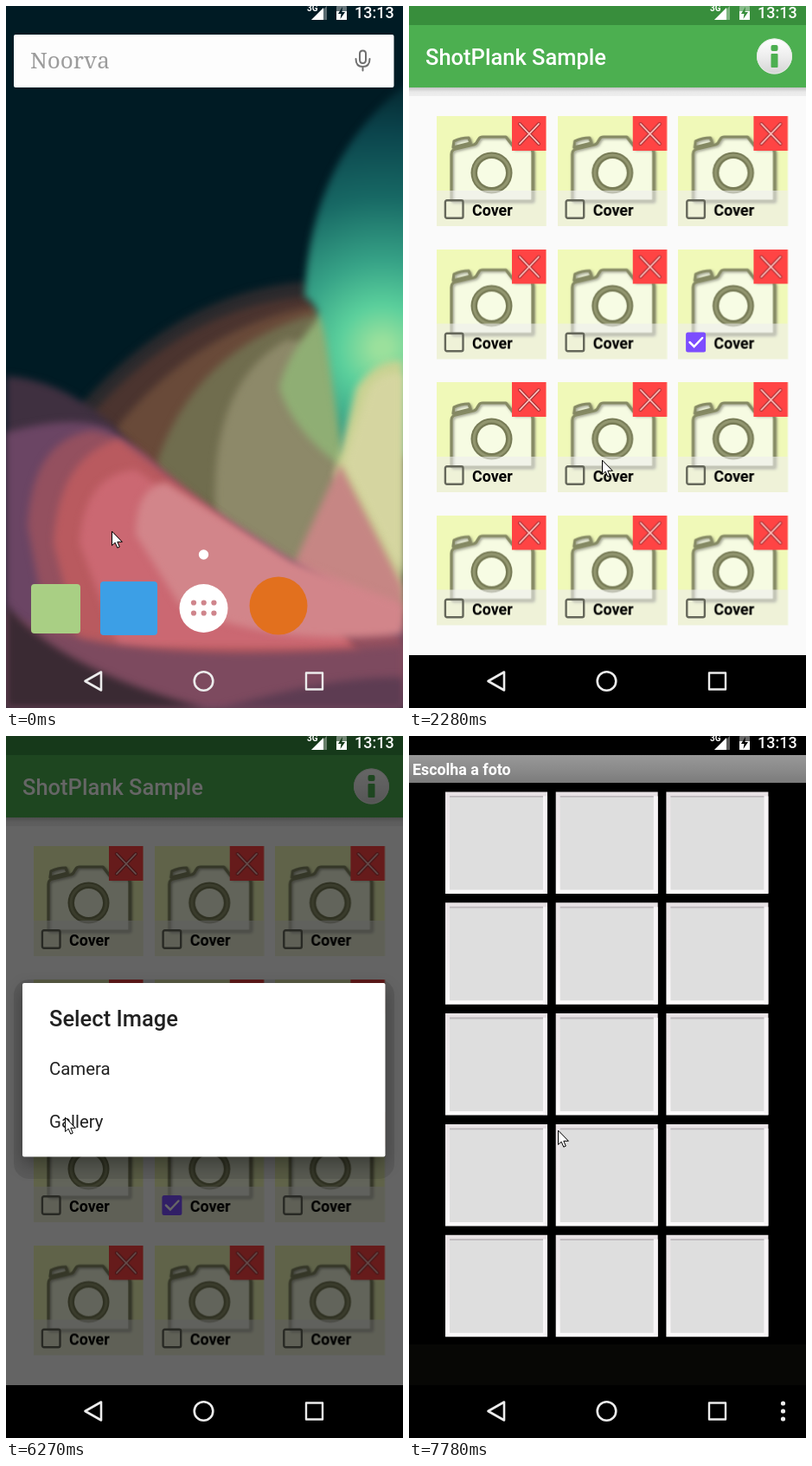
Animation, 459 px wide and 810 px high, one loop 8 s. Source, as an HTML page with a canvas:

```html
<!DOCTYPE html>
<html lang="en">
<head>
<meta charset="utf-8">
<title>Photo picker walkthrough</title>
<style>
html, body { margin: 0; width: 100%; height: 100%; overflow: hidden; background: #000; }
canvas { display: block; width: 100%; height: 100%; }
</style>
</head>
<body>
<canvas id="stage" width="459" height="810"></canvas>
<script>
const W = 459, H = 810, LOOP = 8000, NAV_TOP = 749;
const FONT = 'Roboto, sans-serif';
let ctx = document.getElementById('stage').getContext('2d');

const bursts = [[120, 910, 7], [1060, 1060, 1], [1180, 1330, 2], [1700, 1850, 2], [2280, 3840, 13],
  [3960, 4230, 3], [4510, 5180, 6], [5460, 6270, 7], [6570, 7230, 6], [7510, 7780, 3]];
const ticks = [0, ...bursts.flatMap(([a, b, n]) =>
  Array.from({ length: n }, (_, i) => Math.round(a + (b - a) * i / Math.max(1, n - 1))))];

// Pointer path: [time, x, y]
const pointerPath = [[0, 122, 606], [383, 66, 685], [515, 62, 690], [650, 66, 686], [910, 140, 627],
  [1060, 142, 618], [1700, 142, 618], [1850, 151, 616], [2150, 151, 616], [2280, 223, 524], [2540, 265, 435],
  [2800, 275, 396], [3060, 240, 396], [3320, 80, 388], [3450, 50, 384], [3580, 50, 384], [3840, 130, 438],
  [4090, 178, 515], [4230, 190, 534], [4644, 190, 534], [5180, 219, 490], [5460, 219, 490],
  [6135, 72, 437], [6270, 68, 440], [6700, 68, 440], [7230, 172, 455]];

function pointerAt(t) {
  const i = pointerPath.findIndex(p => p[0] > t);
  if (i < 0) return pointerPath.at(-1).slice(1);
  const [t0, x0, y0] = pointerPath[i - 1], [t1, x1, y1] = pointerPath[i];
  const k = (t - t0) / (t1 - t0);
  return [x0 + (x1 - x0) * k, y0 + (y1 - y0) * k];
}

const progress = (t, start, length) => Math.min(1, Math.max(0, (t - start) / length));

function rect(x, y, w, h, color, r = 0) {
  ctx.fillStyle = color;
  ctx.beginPath();
  ctx.roundRect(x, y, w, h, r);
  ctx.fill();
}
function disc(x, y, r, color) {
  ctx.fillStyle = color;
  ctx.beginPath();
  ctx.arc(x, y, r, 0, 7);
  ctx.fill();
}
function ring(x, y, r, color, width) {
  ctx.strokeStyle = color;
  ctx.lineWidth = width;
  ctx.beginPath();
  ctx.arc(x, y, r, 0, 7);
  ctx.stroke();
}
function fill(path, color) {
  ctx.fillStyle = color;
  ctx.fill(new Path2D(path));
}
function line(path, color, width) {
  ctx.strokeStyle = color;
  ctx.lineWidth = width;
  ctx.stroke(new Path2D(path));
}
function text(s, x, y, size, color, weight = 400, family = FONT) {
  ctx.font = `${weight} ${size}px ${family}`;
  ctx.fillStyle = color;
  ctx.fillText(s, x, y);
}
function gradient(y0, y1, ...colors) {
  const g = ctx.createLinearGradient(0, y0, 0, y1);
  colors.forEach((c, i) => g.addColorStop(i / (colors.length - 1), c));
  return g;
}
function at(x, y, alpha, draw) {
  ctx.save();
  ctx.translate(x, y);
  ctx.globalAlpha *= alpha;
  draw();
  ctx.restore();
}
// Draws once onto a separate layer.
function prerender(w, h, draw) {
  const layer = document.createElement('canvas'), main = ctx;
  layer.width = w;
  layer.height = h;
  ctx = layer.getContext('2d');
  ctx.lineCap = ctx.lineJoin = 'round';
  draw();
  ctx = main;
  return layer;
}

const hills = [
  ['#2b2a2d', 'M85 462Q200 330 345 318L459 400V810H85Z'],
  ['#4b342f', 'M100 470Q210 345 350 335L400 500V810H100Z'],
  ['#694a39', 'M125 490Q220 370 360 345L400 810H125Z'],
  ['#706d4e', 'M170 540Q215 390 370 352L420 810H170Z'],
  ['#8d8969', 'M245 620Q225 440 325 385L385 395L420 810Z'],
  ['#8fae74', 'M316 440Q325 400 370 350L400 380L392 535Q330 490 316 440Z']
];
const slopes = [
  ['#c9d292', 'M459 410Q430 405 405 440L380 540L459 705Z'],
  ['#d5d5a0', 'M459 425Q430 420 418 445L390 530L459 660Z'],
  ['#c68684', 'M386 528L459 670V760L330 650Z'],
  ['#3f3040', 'M0 427Q60 430 120 480L230 595L459 720V810H0Z'],
  ['#6b4564', 'M0 492Q80 470 120 488L200 560L459 720V810H0Z'],
  ['#94505f', 'M25 600Q30 500 100 490Q150 500 180 535L260 600L459 730V790H60Z'],
  ['#b95a5f', 'M55 620Q60 520 130 500L180 538L300 630L420 760H90Z'],
  ['#cb6872', 'M85 620Q90 540 150 535L200 570L350 670L400 740H130Z'],
  ['#d2858a', 'M150 610Q150 555 185 550L330 640L459 690V725Q300 740 200 690Z'],
  ['#7d4a5f', 'M0 700Q120 765 459 738V810H0Z'],
  ['#3a2a33', 'M0 690Q60 765 230 810H0Z'],
  ['#5d3c52', 'M250 810Q380 772 459 775V810Z']
];
const wallpaper = prerender(W, H, () => {
  rect(0, 0, W, H, '#001b24');
  ctx.filter = 'blur(4px)';
  hills.forEach(([color, path]) => fill(path, color));
  const glow = ctx.createRadialGradient(435, 395, 10, 435, 395, 310);
  [[0, '#9be09c'], [.13, '#5bd09c'], [.3, '#37a387'], [.55, '#176864'], [.8, '#0b444c'], [1, '#04262f']]
    .forEach(stop => glow.addColorStop(...stop));
  fill('M470 85Q352 170 345 335Q365 345 372 400L390 520H470Z', glow);
  slopes.forEach(([color, path]) => fill(path, color));
});

const photoCell = prerender(130, 130, () => {
  rect(0, 0, 126.5, 127, '#f0f9b8');
  ctx.shadowColor = 'rgba(70,70,60,.5)';
  ctx.shadowBlur = 3;
  ctx.shadowOffsetX = ctx.shadowOffsetY = 1.5;
  const body = 'M17 96V44Q17 39 22 38L43 33Q46 32 47 29L49 26Q50 24 53 24H80L90 37H108Q111 38 111 42V96Q111 98 109 98H19Q17 98 17 96Z';
  const button = 'M19 36L20 29Q28 25 37 25L39 31Z';
  for (const part of [button, body]) {
    fill(part, '#f6fbe2');
    line(part, '#868a64', 3.2);
  }
  ctx.shadowColor = 'transparent';
  disc(63.5, 65.5, 24, '#777b56');
  ring(63.5, 65.5, 20.5, '#92966f', 3);
  disc(63.5, 65.5, 16.5, '#f7fce4');
  rect(0, 86, 126.5, 41, 'rgba(238,238,238,.6)');
  rect(87, 0, 39.5, 40, '#ff4444');
  const cross = 'M96 9L118 32M118 9L96 32';
  line(cross, '#b03236', 4);
  line(cross, '#ffc4c0', 1.8);
  text('Cover', 41, 114.5, 17.85, '#000', 700);
});

function checkbox(x, y, checked) {
  at(x, y, 1, () => {
    if (!checked) {
      ctx.strokeStyle = '#65675a';
      ctx.lineWidth = 2.4;
      ctx.beginPath();
      ctx.roundRect(1.2, 1.2, 20.6, 20.6, 2);
      ctx.stroke();
      return;
    }
    rect(0, 0, 23, 23, '#7c4dff', 2.5);
    ctx.lineCap = ctx.lineJoin = 'miter';
    line('M4.5 11.5L9.5 16.5L19 6.5', '#fff', 2.5);
  });
}

function statusBar(color) {
  if (color) rect(0, 0, W, 22, color);
  text('3G', 348, 6, 10, '#fff', 700);
  fill('M353 16L371 0V16Z', 'rgba(255,255,255,.35)');
  fill('M353 16L367 2V16Z', '#fff');
  rect(382, 0, 12, 16, 'rgba(255,255,255,.4)', 1);
  rect(382, 6, 12, 10, '#fff');
  fill('M389 1L384 9H387.5L386.5 15L392 7H388.5Z', color || '#001b24');
  text('13:13', 403, 14, 18, '#fff', 500);
}

function navBar(background, menu) {
  if (background) rect(0, NAV_TOP, W, H - NAV_TOP, '#000');
  ctx.lineJoin = 'round';
  line('M91.5 779L110 768.5V789.5Z', '#ececec', 2.6);
  ring(228.5, 779, 10.8, '#ececec', 2.6);
  line('M347 769.5H366V788.5H347Z', '#ececec', 2.4);
  if (menu) [770, 779, 788].forEach(y => disc(432.5, y, 2.6, '#ececec'));
}

function home() {
  ctx.drawImage(wallpaper, 0, 0);
  statusBar();
  rect(9, 33, 439.5, 61, '#fdfdfd', 2);
  text('Noorva', 28, 72, 26, '#9c9c9c', 400, '"Noto Serif", serif');
  rect(408.5, 51, 8, 16, '#fff', 4);
  line('M412.5 51.5Q416 51.5 416 55V62Q416 66 412.5 66Q409 66 409 62V55Q409 51.5 412.5 51.5Z', '#707070', 2);
  line('M404.5 61Q404.5 70 412.5 70Q420.5 70 420.5 61M412.5 70V74.5', '#707070', 2);
  disc(228.5, 633, 5.7, '#fff');
  rect(29, 667, 57, 57, '#a9cf84', 4);
  rect(109, 664, 66, 62, '#3c9fe6', 4);
  disc(228.5, 695, 28, '#fff');
  for (let i = 0; i < 6; i++) disc(217 + i % 3 * 11.7, 688.5 + (i > 2) * 12, 3.1, '#cf858c');
  disc(315, 692, 33.5, '#e2701e');
  navBar(false);
}

function splash() {
  rect(0, 0, W, NAV_TOP, '#fafafa');
  statusBar('#303f9f');
  navBar(true);
}

function infoButton() {
  disc(422.5, 58, 20.5, gradient(38, 79, '#ffffff', '#ededed', '#d4d4d4'));
  ring(422.5, 58, 20, '#e4ebe4', 1);
  rect(418.5, 45, 8, 7, '#4caf50', 2);
  rect(418.5, 55, 8, 16, '#4caf50', 1);
}

function photoApp(t) {
  rect(0, 0, W, NAV_TOP, '#fafafa');
  rect(0, 94, W, 10, gradient(94, 104, '#c4c4c4', '#e8e8e8', '#efefef'));
  rect(0, 22, W, 72, '#4caf50');
  text('ShotPlank Sample', 19, 68, 25.5, '#fff', 500);
  infoButton();
  const selected = t < 1330 ? -1 : t < 3580 ? 5 : t < 4510 ? 3 : 7;
  for (let i = 0; i < 12; i++) {
    const x = 32 + i % 3 * 139.7, y = 127 + Math.floor(i / 3) * 153.5;
    ctx.drawImage(photoCell, x, y);
    checkbox(x + 8.7, y + 96, i === selected);
  }
  statusBar('#388e3c');
  navBar(true, t >= 6960);
}

function dialog(t, alpha) {
  at(0, 0, alpha, () => {
    rect(0, 0, W, NAV_TOP, 'rgba(0,0,0,.6)');
    rect(9, 281, 440, 230, 'rgba(0,0,0,.1)', 18);
    ctx.shadowColor = 'rgba(0,0,0,.35)';
    ctx.shadowBlur = 20;
    ctx.shadowOffsetY = 8;
    rect(19, 285, 419.5, 200.5, '#fff', 2);
    ctx.shadowColor = 'transparent';
    if (t >= 6570) rect(19, 415, 419.5, 61, '#e2e2e2');
    text('Select Image', 50, 335, 25.5, '#212121', 500);
    text('Camera', 50, 391, 20.4, '#212121');
    text('Gallery', 50, 452, 20.4, '#212121');
    statusBar('#16391a');
  });
}

function gallery() {
  rect(0, 0, W, NAV_TOP, '#000');
  rect(0, 702, W, 47, '#070705');
  rect(0, 22, W, 32, gradient(22, 54, '#989898', '#8b8b8b', '#7b7b7b'));
  text('Escolha a foto', 4, 44.5, 17.85, '#fff', 700);
  for (let i = 0; i < 15; i++) {
    at(42 + i % 3 * 127.7, 64.5 + Math.floor(i / 3) * 127.8, 1, () => {
      rect(0, 0, 118, 117.5, gradient(0, 118, '#e8e2e5', '#f0eaed', '#fdfbfc'));
      rect(113, 5, 5, 112, '#f8f5f7');
      rect(5, 5, 108, 108, '#dedede');
      rect(5, 4.5, 108, 1.8, '#bdb8bc');
    });
  }
  statusBar('#000');
}

function pointer(x, y) {
  at(Math.round(x) + .5, Math.round(y) + .5, 1, () => {
    const arrow = 'M0 0V16L3.7 12.7L6.3 18.7L8.8 17.6L6.3 11.8H11.5Z';
    ctx.lineJoin = 'miter';
    fill(arrow, '#fff');
    line(arrow, '#000', 1);
  });
}

function render(now) {
  const time = now % LOOP;
  const t = ticks.findLast(tick => tick <= time);
  ctx.lineCap = 'round';
  if (t < 778) home();
  if (t >= 640 && t < 1180) {
    const opening = progress(t, 510, 260);
    at(0, 60 * (1 - opening), opening, splash);
  }
  if (t >= 1180) {
    photoApp(t);
    const shown = progress(t, 5460, 250) * (1 - progress(t, 6570, 260));
    if (shown > 0) dialog(t, shown);
    const opening = progress(t, 7380, 260);
    if (opening > 0) {
      at(0, 60 * (1 - opening), opening, gallery);
      navBar(true, true);
    }
  }
  pointer(...pointerAt(t));
  requestAnimationFrame(render);
}
const start = performance.now();
requestAnimationFrame(function begin() {
  const loop = render;
  render = () => loop(performance.now() - start);
  render();
});
</script>
</body>
</html>
```
